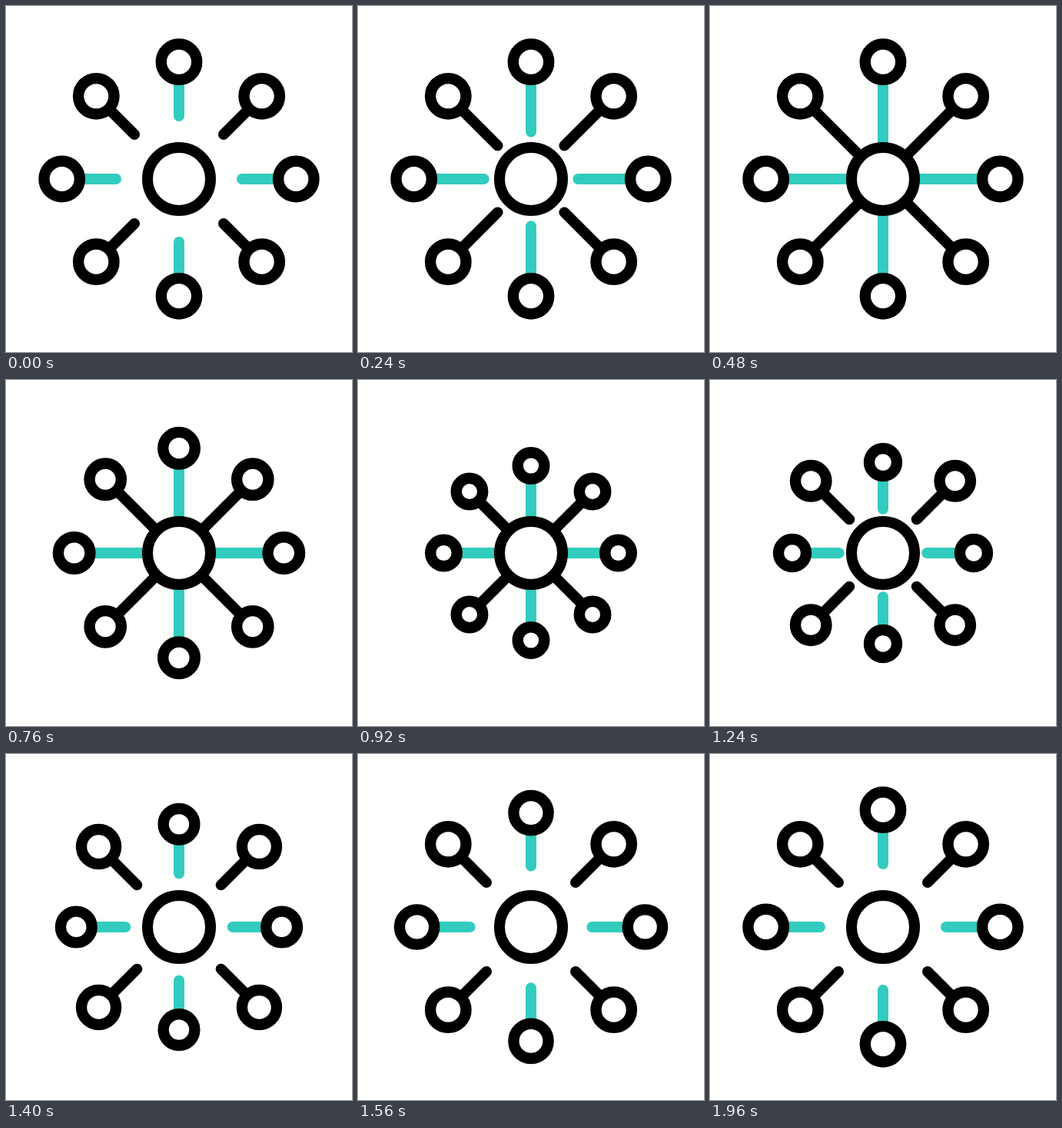
Animation, 450 px wide and 450 px high, one loop 2000 ms. Source, as an HTML page without scripts:

```html
<!DOCTYPE html>
<html lang="en">
<head>
<meta charset="utf-8">
<title>Hub and nodes</title>
<style>
  /* --node: hub to node centre, --tip: hub to the inner end of the line */
  @property --node { syntax: "<length>"; inherits: true; initial-value: 152.3px; }
  @property --tip { syntax: "<length>"; inherits: true; initial-value: 82px; }

  html, body { margin: 0; width: 100%; height: 100%; overflow: hidden; background: #fffffe; }
  svg { display: block; width: 100vw; height: 100vh; }

  .spokes g {
    transform: rotate(calc(var(--turn) * 90deg));
    animation: 2s cubic-bezier(.333, 0, .667, 1) infinite;
  }
  .spokes .cross { animation-name: cross-node, cross-tip; }
  .spokes .diagonal { animation-name: diagonal-node, diagonal-tip; }

  rect {
    x: calc(var(--tip) - 7px);
    y: -7px;
    width: calc(var(--node) - var(--tip) + 7px);
    height: 14px;
    rx: 7px;
  }
  .cross rect { fill: #32ccbe; }

  circle { fill: #fffffe; stroke: #000; stroke-width: 14.4; }
  .spokes circle { cx: var(--node); r: calc(var(--node) * .1524); }
  .hub { r: 41px; stroke-width: 14; }

  @keyframes cross-node {
    30.5%, 83.5% { --node: 152.3px; }
    48%, 55.25% { --node: 112.1px; }
  }
  @keyframes cross-tip {
    24%, 45.5% { --tip: 41px; }
    84% { --tip: 82px; }
  }
  @keyframes diagonal-node {
    30.25%, 76% { --node: 152.3px; }
    47.75% { --node: 112.1px; }
  }
  @keyframes diagonal-tip {
    24%, 47.75% { --tip: 41px; }
    76% { --tip: 82px; }
  }
</style>
</head>
<body>
<svg viewBox="-225 -225 450 450">
  <g class="spokes">
    <g class="cross" style="--turn: 0"><rect/><circle/></g>
    <g class="cross" style="--turn: 1"><rect/><circle/></g>
    <g class="cross" style="--turn: 2"><rect/><circle/></g>
    <g class="cross" style="--turn: 3"><rect/><circle/></g>
    <g class="diagonal" style="--turn: .5"><rect/><circle/></g>
    <g class="diagonal" style="--turn: 1.5"><rect/><circle/></g>
    <g class="diagonal" style="--turn: 2.5"><rect/><circle/></g>
    <g class="diagonal" style="--turn: 3.5"><rect/><circle/></g>
  </g>
  <circle class="hub"/>
</svg>
</body>
</html>
```
